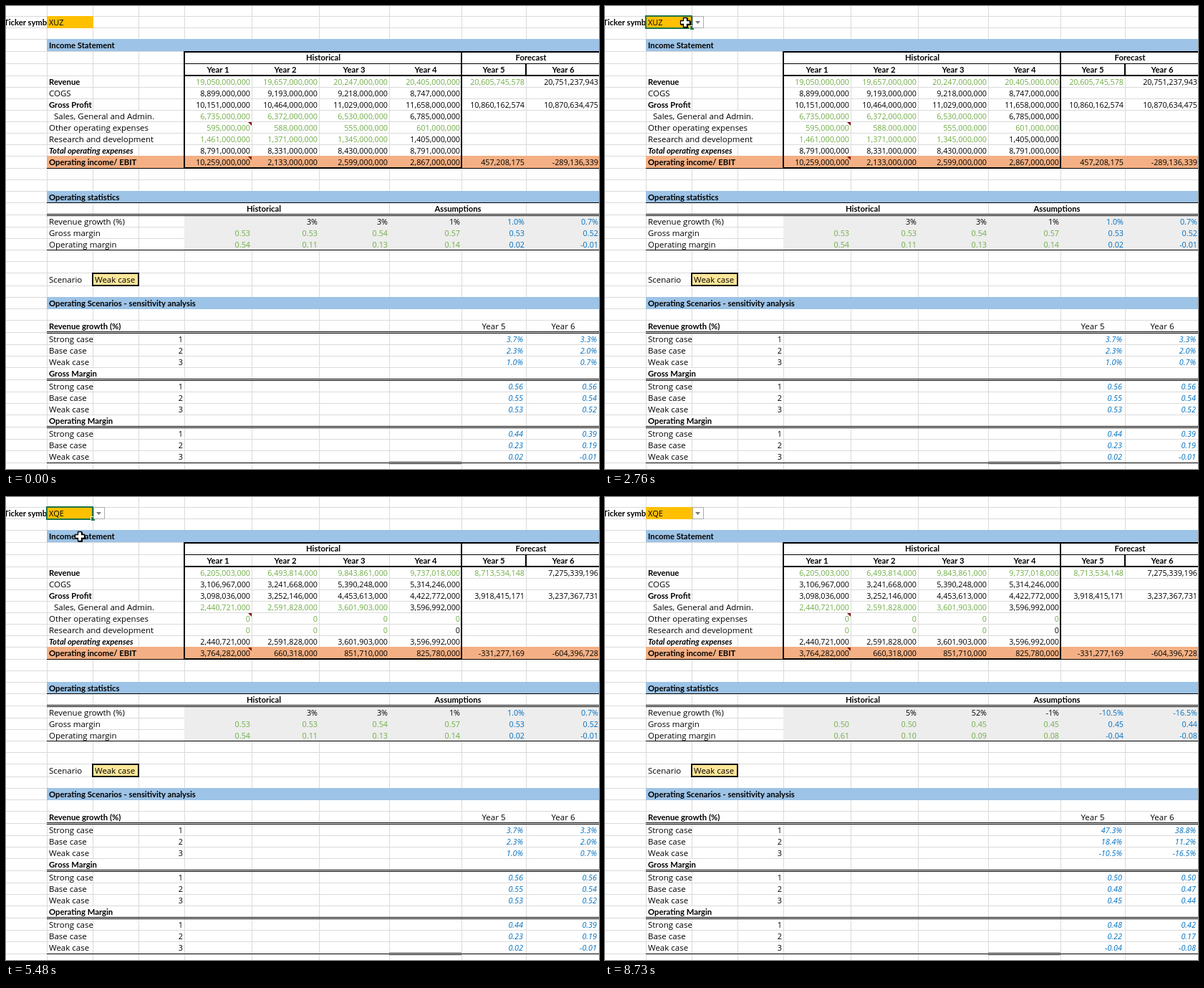
Animation, 828 px wide and 646 px high, one loop 8.84 s. Source, as an HTML page:

```html
<!DOCTYPE html>
<html lang="en">
<head>
<meta charset="utf-8">
<title>Operating scenarios</title>
<style>
  html, body { margin: 0; width: 100%; height: 100%; overflow: hidden; background: #fff; }
  svg { display: block; }
  text { font-family: "Open Sans", "Noto Sans", sans-serif; font-size: 11.5px; white-space: pre; }
  .b { font-family: Lato, "Open Sans", sans-serif; font-size: 11.3px; font-weight: 700; }
  .n { font-size: 10.8px; }
  .s { font-size: 11px; }
  .i { font-style: italic; }
  .r { text-anchor: end; }
  .m { text-anchor: middle; }
</style>
</head>
<body>
<svg id="stage" width="828" height="646" viewBox="0 0 828 646"></svg>
<script>
const LOOP = 8840;
const GREEN = '#70ad47', BLUE = '#0070c0', BLACK = '#000', GRID = '#dadada';
const BAND = '#9dc3e6', GOLD = '#ffc000', PICK = '#217346';
const cols = [57, 121, 185, 249, 343, 437, 535, 636, 726];
const rightEdge = [341, 435, 533, 634, 724, 827];
const yearMid = [296, 390, 486, 586, 681, 778];
const symbols = 'XQA XQE XQIL XQOV XQU XUZ XVEK XVI XVM XVO XVUK XWE'.split(' ');
const stage = document.getElementById('stage');

function el(tag, attrs, parent = stage) {
  const node = document.createElementNS('http://www.w3.org/2000/svg', tag);
  for (const key in attrs) node.setAttribute(key, attrs[key]);
  return parent.appendChild(node);
}
const group = () => el('g', {});
const box = (x, y, width, height, fill, parent) =>
  el('rect', { x, y, width, height, fill }, parent);
const path = (d, attrs, parent) => el('path', { d, fill: 'none', ...attrs }, parent);
function text(x, y, str, cls = '', fill = BLACK, parent = stage) {
  const node = el('text', { x, y, class: cls, fill }, parent);
  node.textContent = str;
  return node;
}
const show = (node, on) => node.setAttribute('visibility', on ? 'visible' : 'hidden');

// A label that runs over empty cells hides the grid lines it crosses.
function label(y, str, cls, x = 60) {
  const node = text(x, y, str, cls);
  const end = x + node.getComputedTextLength();
  for (const c of [121, 185]) {
    if (end > c + 3) stage.insertBefore(box(c, y - 12, 1, 15, '#fff'), node);
  }
}

function drawGrid() {
  const rows = [14, 30, 46, 63, 80, 97, 113, 129, 145, 161, 177, 193, 209, 226, 242, 258,
    274, 291, 308, 324, 340, 356, 372, 390, 406, 422, 438, 455, 472, 488, 504, 521, 538,
    554, 570, 587, 604, 620, 637];
  for (const y of rows) box(0, y, 828, 1, GRID);
  for (const x of cols) box(x, 0, 1, 646, GRID);
}

function band(y, h, str) {
  box(57, y, 771, h, BAND);
  text(60, y + 13, str, 'b');
}

function doubleLine(y, x = 57, w = 771) {
  box(x, y, w, 3, '#fff');
  box(x, y, w, 1, BLACK);
  box(x, y + 2, w, 1, BLACK);
}

function drawIncome() {
  band(46, 17, 'Income Statement');
  box(250, 65, 578, 15, '#fff');
  box(57, 209, 771, 17, '#f4b084');
  const labels = ['Revenue', 'COGS', 'Gross Profit', 'Sales, General and Admin.',
    'Other operating expenses', 'Research and development', 'Total operating expenses',
    'Operating income/ EBIT'];
  const styles = ['b', '', 'b', '', '', '', 'b i', 'b'];
  labels.slice(0, 7).forEach((str, i) => label(110 + 16 * i, str, styles[i], i === 3 ? 67 : 60));
  text(60, 222, labels[7], 'b');
  text(443, 76, 'Historical', 'b m');
  text(733, 76, 'Forecast', 'b m');
  yearMid.forEach((x, i) => text(x, 93, 'Year ' + (i + 1), 'b m'));

  for (const y of [63, 80, 96]) box(248, y, 580, y === 80 ? 1 : 2, BLACK);
  box(57, 226, 771, 1, BLACK);
  box(248, 225, 389, 2, BLACK);
  box(248, 63, 2, 164, BLACK);
  box(635, 63, 2, 164, BLACK);
  box(725, 80, 2, 17, BLACK);
  for (const y of [162, 210]) path(`M338 ${y}h5v5z`, { fill: '#8b1010' });
}

function drawStats() {
  band(258, 16, 'Operating statistics');
  box(186, 275, 349, 15, '#fff');
  box(536, 275, 190, 15, '#fff');
  box(249, 292, 579, 48, '#ededed');
  box(57, 274, 771, 1, BLACK);
  doubleLine(290);
  box(57, 340, 771, 1, BLACK);
  text(360, 287, 'Historical', 'b m');
  text(631, 287, 'Assumptions', 'b m');
  ['Revenue growth (%)', 'Gross margin', 'Operating margin']
    .forEach((str, i) => label(305 + 16 * i, str));
}

function drawScenarios() {
  label(386, 'Scenario');
  el('rect', { x: 121, y: 373, width: 64, height: 17, fill: '#ffe699', stroke: BLACK, 'stroke-width': 2 });
  text(124, 386, 'Weak case');
  band(406, 17, 'Operating Scenarios - sensitivity analysis');
  text(681, 451, 'Year 5', 'm');
  text(778, 451, 'Year 6', 'm');
  ['Revenue growth (%)', 'Gross Margin', 'Operating Margin'].forEach((title, i) => {
    const y = 451 + 66 * i;
    label(y, title, 'b');
    doubleLine(y + 3);
    ['Strong case', 'Base case', 'Weak case'].forEach((str, k) => {
      label(y + 18 + 16 * k, str);
      text(247, y + 18 + 16 * k, k + 1, 'n r');
    });
  });
  box(57, 637, 771, 1, BLACK);
  doubleLine(636, 535, 101);
}

// Amounts of the four past years are in thousands; forecasts are in full.
const first = {
  revenue: [19050000, 19657000, 20247000, 20405000],
  cogs: [8899000, 9193000, 9218000, 8747000],
  admin: [6735000, 6372000, 6530000, 6785000],
  other: [595000, 588000, 555000, 601000],
  research: [1461000, 1371000, 1345000, 1405000],
  forecast: [[20605745578, 20751237943], [10860162574, 10870634475], [457208175, -289136339]],
  cases: [[[3.7, 3.3], [2.3, 2.0], [1.0, 0.7]],
          [[.56, .56], [.55, .54], [.53, .52]],
          [[.44, .39], [.23, .19], [.02, -.01]]]
};
const second = {
  revenue: [6205003, 6493814, 9843861, 9737018],
  cogs: [3106967, 3241668, 5390248, 5314246],
  admin: [2440721, 2591828, 3601903, 3596992],
  other: [0, 0, 0, 0],
  research: [0, 0, 0, 0],
  forecast: [[8713534148, 7275339196], [3918415171, 3237367731], [-331277169, -604396728]],
  cases: [[[47.3, 38.8], [18.4, 11.2], [-10.5, -16.5]],
          [[.50, .50], [.48, .47], [.45, .44]],
          [[.48, .42], [.22, .17], [-.04, -.08]]]
};

// Returns one group of figures for each of the three tables.
function drawFigures(d) {
  const [income, stats, scenarios] = [group(), group(), group()];
  const num = v => v.toLocaleString('en-US');
  const rate = (v, i) => i ? v.toFixed(2) : v.toFixed(1) + '%';
  const put = (col, y, str, fill, parent) => text(rightEdge[col], y, str, 'n r', fill, parent);

  for (let c = 0; c < 4; c++) {
    const rev = d.revenue[c];
    const gross = rev - d.cogs[c];
    const total = d.admin[c] + d.other[c] + d.research[c];
    const ebit = (c ? gross : rev) - total;
    const past = c < 3 ? GREEN : BLACK;
    const fills = [GREEN, BLACK, BLACK, past, GREEN, past, BLACK, BLACK];
    [rev, d.cogs[c], gross, d.admin[c], d.other[c], d.research[c], total, ebit]
      .forEach((v, i) => put(c, 110 + 16 * i, num(v * 1000), fills[i], income));
    if (c) put(c, 305, Math.round((rev / d.revenue[c - 1] - 1) * 100) + '%', BLACK, stats);
    put(c, 321, (gross / rev).toFixed(2), GREEN, stats);
    put(c, 337, (ebit / rev).toFixed(2), GREEN, stats);
  }
  for (let c = 0; c < 2; c++) {
    [110, 142, 222].forEach((y, i) =>
      put(c + 4, y, num(d.forecast[i][c]), i || c ? BLACK : GREEN, income));
    d.cases.forEach((rows, i) => {
      put(c + 4, 305 + 16 * i, rate(rows[2][c], i), BLUE, stats);
      rows.forEach((row, k) =>
        text([722, 825][c], 469 + 66 * i + 16 * k, rate(row[c], i), 'n r i', BLUE, scenarios));
    });
  }
  return [income, stats, scenarios];
}

function drawSelection() {
  const g = group();
  el('rect', { x: 57, y: 14, width: 64, height: 17, fill: 'none', stroke: '#fff3d0' }, g);
  el('rect', { x: 57, y: 14, width: 64, height: 17, fill: 'none', stroke: PICK, 'stroke-width': 2 }, g);
  box(118, 27, 6, 6, '#fff', g);
  box(119, 28, 5, 5, PICK, g);
  return g;
}

function drawButton() {
  const g = group();
  el('rect', { x: 122.5, y: 14.5, width: 15, height: 16, fill: '#fff', stroke: '#ababab' }, g);
  path('M126 21h7l-3.5 4z', { fill: '#777' }, g);
  return g;
}

function drawList() {
  const g = group();
  el('rect', { x: 57.5, y: 32.5, width: 82, height: 204, fill: '#fff', stroke: '#8c8c8c' }, g);
  const mark = box(58, 117, 64, 17, '#d9d9d9', g);
  symbols.forEach((str, i) => text(64, 45 + 17 * i, str, 's', BLACK, g));
  box(122, 33, 17, 203, '#f0f0f0', g);
  box(123, 49, 15, 17, '#cdcdcd', g);
  const line = { stroke: '#505050', 'stroke-width': 1.6 };
  path('M127 43l3.5-4 3.5 4', line, g);
  path('M127 226l3.5 4 3.5-4', line, g);
  return { g, mark };
}

function drawCursors() {
  const arrow = group(), cross = group();
  path('M.5.5V16.5L4.2 13 6.7 18.6 9 17.6 6.6 12H11.5Z', { fill: '#fff', stroke: BLACK }, arrow);
  const plus = 'M-2.5-6.5h5v4h4v5h-4v4h-5v-4h-4v-5h4z';
  path(plus, { fill: BLACK, stroke: BLACK, transform: 'translate(1 1)' }, cross);
  path(plus, { fill: '#fff', stroke: BLACK, 'stroke-width': 1.3 }, cross);
  return { arrow, cross };
}

drawGrid();
text(-3, 27, 'Ticker symbol', 'b');
drawIncome();
drawStats();
drawScenarios();
const before = drawFigures(first), after = drawFigures(second);
box(57, 14, 65, 17, GOLD);
const ticker = text(60, 27, '', 's');
const selection = drawSelection();
const button = drawButton();
const list = drawList();
const cursors = drawCursors();

const linear = u => u;
const easeOut = u => 1 - (1 - u) ** 2;
const smooth = u => u * u * (3 - 2 * u);
// Each move: first step, last step, number of steps, end point, easing.
const moves = [
  [530, 530, 1, 688, 476, linear],
  [600, 1010, 7, 136, 61, easeOut],
  [1080, 1350, 5, 106, 23, easeOut],
  [1420, 1420, 1, 101, 22, linear],
  [1560, 1560, 1, 97, 18, linear],
  [1630, 1700, 2, 102, 23, linear],
  [1890, 2030, 3, 112, 23, linear],
  [2830, 3090, 4, 122, 21, smooth],
  [3230, 3230, 1, 122, 22, linear],
  [3880, 4290, 7, 103, 55, smooth],
  [6140, 6550, 7, 131, 31, smooth],
  [6750, 7570, 13, 739, 586, smooth],
  [7640, 7640, 1, 772, 606, linear]
];

function cursorAt(t) {
  let x = 688, y = 476;
  for (const [from, to, steps, x1, y1, ease] of moves) {
    if (t < from) break;
    const done = to > from ? 1 + Math.floor((t - from) / (to - from) * (steps - 1) + 1e-6) : 1;
    const u = ease(Math.min(done, steps) / steps);
    x += (x1 - x) * u;
    y += (y1 - y) * u;
  }
  return [Math.round(x), Math.round(y)];
}

function render(t) {
  const within = (a, b) => t >= a && t < b;
  ticker.textContent = symbols[t < 4710 ? 5 : 1];
  show(selection, within(2230, 8730));
  show(button, t >= 2300);
  show(list.g, within(3430, 4710));
  list.mark.setAttribute('y', 32 + 17 * (t < 4510 ? 5 : 1));

  [5400, 5540, 5670].forEach((at, i) => {
    show(before[i], t < at);
    show(after[i], t >= at);
  });

  const place = `translate(${cursorAt(t)})`;
  const pointing = within(530, 1560) || within(2960, 4710);
  const present = within(530, 7710);
  cursors.arrow.setAttribute('transform', place);
  cursors.cross.setAttribute('transform', place);
  show(cursors.arrow, present && pointing);
  show(cursors.cross, present && !pointing);
}

const start = performance.now();
function tick() {
  render((performance.now() - start) % LOOP);
  requestAnimationFrame(tick);
}
tick();
</script>
</body>
</html>
```
